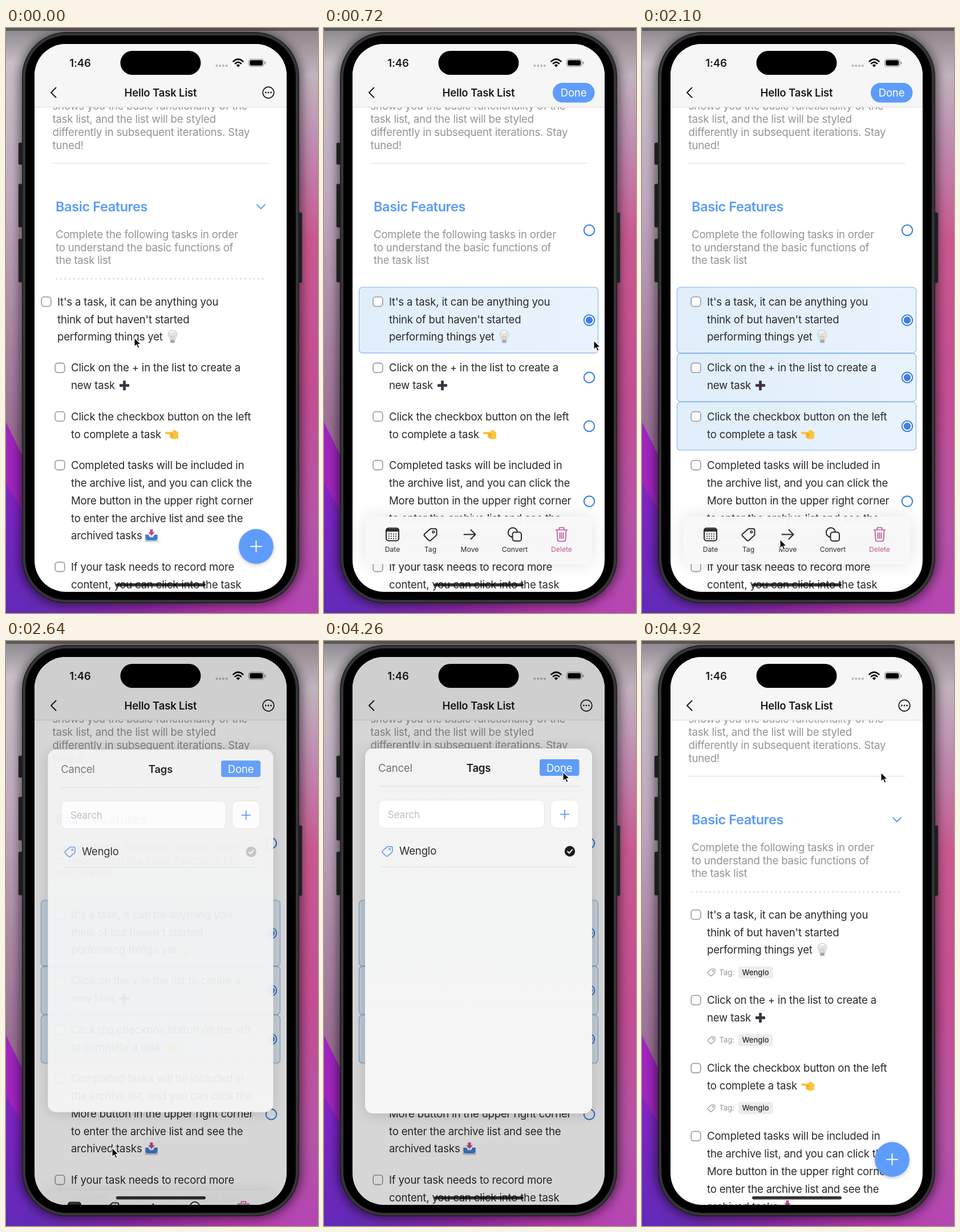
Write an HTML page that moves like this. It is 547x1024 px and loops after 4980 ms.

```html
<!DOCTYPE html>
<html lang="en">
<head>
<meta charset="utf-8">
<title>Task list</title>
<style>
html, body { margin: 0; width: 100%; height: 100%; overflow: hidden; background: #b49ab2; }
svg { display: block; width: 100%; height: 100%; }
text { font: 400 18.6px Inter, Roboto, sans-serif; letter-spacing: -.19px; fill: #2a2a2e; }
.note { fill: #949499; }
.head { font-size: 23.5px; font-weight: 600; letter-spacing: -.4px; fill: #5a9bfa; }
.bold { font-weight: 600; fill: #1c1c1e; }
.medium { font-weight: 500; }
.mid { text-anchor: middle; }
.white { fill: #fff; }
.soft { fill: #737378; }
.hint { font-size: 17.4px; fill: #c0c0c5; }
.label { font-size: 12.2px; letter-spacing: 0; text-anchor: middle; }
.pink { fill: #c2559a; }
.small { font-size: 13px; letter-spacing: 0; }
.line { fill: none; stroke-linecap: round; stroke-linejoin: round; }
.bar { filter: drop-shadow(0 0 14px rgba(0,0,0,.12)); }
.card { filter: drop-shadow(0 2px 12px rgba(0,0,0,.16)); }
.fab { filter: drop-shadow(0 2px 3px rgba(0,0,0,.22)); }
</style>
</head>
<body>
<svg id="stage" viewBox="0 0 547 1024" preserveAspectRatio="none"></svg>
<script>
const LOOP = 4980, STEP = 60, TAG = 'Wenglo';
const BLUE = '#5e9cfb', INK = '#2a2a2e', PINK = '#c2559a';

// ---- drawing helpers
const text = (x, y, s, cls = '') => `<text x="${x}" y="${y}" class="${cls}">${s}</text>`;
const rect = (x, y, w, h, r, fill, more = '') =>
  `<rect x="${x}" y="${y}" width="${w}" height="${h}" rx="${r}" fill="${fill}" ${more}/>`;
const dot = (x, y, r, fill, more = '') => `<circle cx="${x}" cy="${y}" r="${r}" fill="${fill}" ${more}/>`;
const line = (d, color, w = 2) => `<path class="line" d="${d}" stroke="${color}" stroke-width="${w}"/>`;
const at = (x, y, s, scale = 1) => `<g transform="translate(${x} ${y}) scale(${scale})">${s}</g>`;
const group = (id, s) => `<g id="${id}">${s}</g>`;
const grad = (id, stops, dir = 'x2="0" y2="1"') => `<linearGradient id="${id}" ${dir}>` +
  stops.map(([o, c]) => `<stop offset="${o}" stop-color="${c}"/>`).join('') + '</linearGradient>';

const tagIcon = (color, w = 2) => line(
  'M1-10h7q3 0 3 3v7q0 1-1 2L1 10q-2 2-4 0L-10 3q-2-2 0-4L-1-9q1-1 2-1Z', color, w) +
  dot(5.3, -4.4, 1.8, 'none', `stroke="${color}" stroke-width="${w * .8}"`);

const pics = {
  bulb: `<path d="M-5 5C-5 1-8-1-8-4A8 8 0 0 1 8-4C8-1 5 1 5 5Z" fill="#e3e3e2" stroke="#c4c4c3" stroke-width=".8"/>` +
    line('M-4-7Q-2-10 2-9', '#fff', 2) +
    line('M-2 4L-3-2 0 0 3-2 2 4', '#c9b98f', .8) + rect(-4, 5, 8, 5.5, 2, '#a9a9ab'),
  plus: rect(-8.5, -2.4, 17, 4.8, .8, '#3b3541') + rect(-2.4, -8.5, 4.8, 17, .8, '#3b3541'),
  hand: `<path d="M-10-4H1L4-7Q6-8 8-6L12-3V7Q7 10 1 8L-2 6Q-4 4-2 2L-3 0H-10Q-12-2-10-4Z" fill="#fcc43c"/>` +
    line('M-2 2H3M-1 5H3M-3 0H4', '#dd9420', 1),
  tray: rect(-11.5, 1, 23, 10, 1.5, '#c9ced6') +
    `<path d="M-11-2H-5L-3 3H3L5-2H11L10 6Q9 8 7 8H-7Q-9 8-10 6Z" fill="#3d79d2"/>` +
    `<path d="M-2.5-11H2.5V-6H6L0 0-6-6H-2.5Z" fill="#bd4792"/>`
};

// ---- tasks: centre of first line, text lines, picture [name, x, line]
const rows = [
  [479, ["It's a task, it can be anything you", "think of but haven't started", 'performing things yet'], ['bulb', 316, 2]],
  [594.8, ['Click on the + in the list to create a', 'new task'], ['plus', 207.5, 1]],
  [680, ['Click the checkbox button on the left', 'to complete a task'], ['hand', 290, 1]],
  [765.2, ['Completed tasks will be included in', 'the archive list, and you can click the',
    'More button in the upper right corner', 'to enter the archive list and see the', 'archived tasks'], ['tray', 255, 4]],
  [943.2, ['If your task needs to record more', 'content, you can click into the task']]
];
const PITCH = 30.9;
const ring = cy => dot(465, cy, 9.2, '#fff', 'stroke="#3d80e6" stroke-width="2.1"');

function rowMarkup([y, lines, pic], i) {
  const h = lines.length * PITCH + 23.2, marked = i < 3, cy = y + h / 2 - 25.5;
  let s = '';
  if (marked) s += group('box' + i, rect(61.5, y - 25.2, 419, h - .8, 6, 'url(#pickFill)', 'stroke="#86b2ee" stroke-width="1.1"'));
  let body = rect(86.2, y - 8.3, 16.6, 16.6, 4.6, '#fff', 'stroke="#a2a2a7" stroke-width="1.8"');
  lines.forEach((t, n) => body += text(114, y + 6.6 + n * PITCH, t));
  if (pic) body += at(pic[1], y + pic[2] * PITCH, pics[pic[0]]);
  s += group('body' + i, body);
  if (marked) {
    const ty = y + lines.length * PITCH + 8.3;
    s += group('tag' + i, at(121.5, ty, tagIcon('#98989d', 2.2), .58) + text(135.5, ty + 4.7, 'Tag:', 'small note') +
      rect(169, ty - 10.5, 60.5, 21, 4, '#ececee') + text(199, ty + 4.7, TAG, 'small medium mid'));
  }
  if (i < 4) s += `<g class="radio">${ring(cy)}${marked ? dot(465, cy, 6.2, '#3d80e6', `id="dot${i}"`) : ''}</g>`;
  return group('row' + i, s);
}

// ---- scenery and phone
const defs = '<defs>' +
  grad('leftFill', [[0, '#8b868b'], [.06, '#c8c1c8'], [.3, '#bfa8be'], [.55, '#a983a2'], [.72, '#986b92']]) +
  grad('rightFill', [[0, '#8c858a'], [.08, '#c2b3be'], [.2, '#bf8bb0'], [.36, '#c9588f'], [.62, '#c44e94'], [.85, '#b653a6'], [1, '#b445b2']]) +
  grad('floorFill', [[0, '#622ab4'], [.4, '#8a2aa8'], [.75, '#b23aa6'], [1, '#b445b2']], '') +
  grad('violetFill', [[0, '#8424c6'], [1, '#622ab8']]) +
  grad('pickFill', [[0, '#dfeefa'], [1, '#e9f3fd']], '') +
  grad('sheetFill', [[0, '#f3f3f3'], [.5, '#f3f4f4'], [1, '#f5f5f5']]) +
  '<filter id="blur" x="-20%" y="-20%" width="140%" height="140%"><feGaussianBlur stdDeviation="9"/></filter>' +
  '<clipPath id="glass"><rect x="50" y="28" width="442" height="959" rx="55"/></clipPath>' +
  '<clipPath id="pageClip"><rect x="50" y="138" width="442" height="849"/></clipPath></defs>';

const scenery = rect(0, 0, 274, 1024, 0, 'url(#leftFill)') + rect(274, 0, 273, 1024, 0, 'url(#rightFill)') +
  '<path d="M0 690L60 812V1024H0Z" fill="#a125bf"/><path d="M0 798L60 892V1024H0Z" fill="url(#violetFill)"/>' +
  rect(40, 985, 470, 39, 0, 'url(#floorFill)') +
  rect(24, 8, 494, 1002, 80, '#000', 'opacity=".55" filter="url(#blur)"') +
  rect(0, 0, 547, 5, 0, '#333', 'opacity=".55"');

const phone = [[22, 201, 38], [22, 273, 76], [22, 369, 76], [511, 323, 123]]
  .map(([x, y, h]) => rect(x, y, 8, h, 2, '#1d1d1f', 'stroke="#39393b" stroke-width=".8"')).join('') +
  rect(28.7, 7.7, 484.6, 998.6, 78, '#353537', 'stroke="#1c1c1e" stroke-width="1.4"') +
  rect(34, 13, 474, 988, 72, '#000');

const nav = rect(50, 28, 442, 110, 0, '#f6f6f6') + rect(50, 138, 442, 1, 0, '#dcdcde') +
  text(130, 67.6, '1:46', 'bold mid') +
  [0, 1, 2, 3].map(i => dot(369.5 + i * 5.8, 66, 2, '#b4b4b9')).join('') +
  line('M398.5 58.5Q407 50.8 415.5 58.5M401.8 62.2Q407 57.6 412.2 62.2', '#000', 2.5) +
  '<path d="M403.7 65Q407 62 410.3 65L407 68.4Z"/>' +
  rect(425.5, 54.5, 26.5, 13, 4, 'none', 'stroke="#8c8c8e" stroke-width="1.1"') +
  rect(427.3, 56.3, 22.9, 9.4, 2.6, '#000') + rect(453.5, 58.8, 1.8, 4.6, .9, '#8c8c8e') +
  line('M87.5 104.5L79 113 87.5 121.5', '#1c1c1e', 2) + text(271, 119.6, 'Hello Task List', 'bold mid') +
  group('menu', dot(460, 113, 9.8, 'none', 'stroke="#1c1c1e" stroke-width="1.7"') +
    [-4.6, 0, 4.6].map(d => dot(460 + d, 113, 1.4, '#1c1c1e')).join('')) +
  group('done', rect(401, 96, 73.5, 34.5, 17.2, BLUE) + text(437.5, 119.8, 'Done', 'mid white'));

const dots = Array.from({ length: 48 }, (_, i) => dot(88.5 + i * 7.7, 439, 1.2, '#d0d0d4')).join('');
const page = ['shows you the basic functionality of the', 'task list, and the list will be styled',
  'differently in subsequent iterations. Stay', 'tuned!'].map((t, i) => text(81.5, 143.4 + i * 22.8, t, 'note')).join('') +
  rect(82, 236.3, 379, 1.2, 0, '#dedee0') + text(87, 320.8, 'Basic Features', 'head') +
  ['Complete the following tasks in order', 'to understand the basic functions of', 'the task list']
    .map((t, i) => text(87, 367.6 + i * 22.9, t, 'note')).join('') +
  group('fold', line('M440 309.3L447 316.3 454 309.3', BLUE, 2) + dots) +
  `<g class="radio">${ring(354)}</g>` + rows.map(rowMarkup).join('');

const fab = dot(0, 0, 30.4, BLUE, 'class="fab"') + line('M-9.5 0H9.5M0-9.5V9.5', '#fff', 2);

// ---- bottom toolbar
const calendar = rect(-11, -11, 22, 22, 4, 'none', `stroke="${INK}" stroke-width="2"`) + rect(-11, -10, 22, 5, 1, INK) +
  [-1, 3, 7].map(y => [-6, -2, 2, 6].map(x => dot(x, y, 1.1, INK)).join('')).join('');
const convert = dot(-3.5, -3.5, 8.2, 'none', `stroke="${INK}" stroke-width="2"`) +
  rect(-4, -4, 15.5, 15.5, 4, '#f8f8f8', `stroke="${INK}" stroke-width="2"`);
const trash = line('M-10-8H10M-4-8V-12H4V-8M-8-8L-7 9Q-7 12-4 12H4Q7 12 7 9L8-8M-3-3V7M0-3V7M3-3V7', PINK, 1.7);
const tools = [[120, calendar, 'Date'], [186.5, tagIcon(INK), 'Tag'], [255.5, line('M-10 0H10M2-8L10 0 2 8', INK), 'Move'],
  [334.5, convert, 'Convert'], [416.5, trash, 'Delete', 'pink']];
const bar = rect(72, 855, 398, 83.5, 12, '#f8f8f8', 'class="bar" fill-opacity=".97"') +
  tools.map(([x, icon, name, tint = '']) => at(x, 886.5, icon) + text(x, 917, name, 'label ' + tint)).join('');

// ---- tag sheet
const sheet = rect(72, 188, 398, 639, 14, 'url(#sheetFill)', 'class="card"') +
  text(95, 228.6, 'Cancel', 'soft') + text(271, 228.6, 'Tags', 'bold mid') +
  rect(378, 207, 69.5, 29, 4, BLUE) + text(412.7, 228.6, 'Done', 'mid white') +
  rect(95, 253.8, 352, 1, 0, '#dcdcde') +
  rect(95.5, 278.5, 291, 49, 10, '#fff', 'stroke="#e6e6e8"') + text(111.5, 309.6, 'Search', 'hint') +
  rect(397.5, 278.5, 49, 49, 10, '#fff', 'stroke="#e6e6e8"') + line('M414.5 303.3H429.5M422 295.8V310.8', BLUE, 1.8) +
  at(111, 368, tagIcon('#5a94e6', 1.8), .82) + text(132, 374.4, TAG) +
  dot(431, 368, 9.2, '#c4c4c6', 'id="check"') + line('M427 368.4L430 371.3 435.2 365.2', '#fff', 1.9) +
  rect(100, 395, 340, 1, 0, '#e0e0e2');

const stage = document.getElementById('stage');
stage.innerHTML = defs + scenery + phone +
  '<g clip-path="url(#glass)">' + rect(50, 28, 442, 959, 0, '#fff') +
  `<g clip-path="url(#pageClip)">${page}</g>` + nav + group('fab', fab) + group('bar', bar) +
  group('dim', rect(50, 28, 442, 959, 0, '#000')) +
  group('sheet', sheet) + rect(193, 972, 157, 5.4, 2.7, '#000', 'opacity=".8"') + '</g>' +
  rect(200.5, 40, 141, 42, 21, '#000') +
  group('cursor', '<path d="M0 0V16L3.7 12.6 6.3 18.4 9 17.2 6.4 11.6H11.4Z" stroke="#fff" stroke-width="1.2"/>');

// ---- motion tables: [ms, value]
const tracks = {
  x: [[0, 225], [120, 206], [240, 206], [660, 473], [720, 473], [840, 466], [960, 465], [1260, 465], [2100, 242],
    [2280, 186], [2760, 186], [3360, 428], [3600, 428], [4140, 419], [LOOP, 419]],
  y: [[0, 542], [240, 543], [660, 547], [720, 547], [840, 617], [900, 617], [1020, 702], [1260, 702], [2100, 895],
    [2280, 887], [2760, 887], [3360, 370], [3600, 370], [4140, 229], [4800, 230]],
  swipe: [[0, -24], [120, -44], [240, -44], [480, 0]],
  edit: [[240, 0], [420, 1], [4440, 1], [4620, 0]],
  done: [[240, 0], [420, 1], [2400, 1], [2520, 0]],
  bar: [[240, 165], [540, 0], [2460, 0], [2760, 165]],
  fab: [[180, 1], [360, 0], [4560, 0], [4740, 1]],
  pick0: [[240, 0], [360, 1], [4440, 1], [4620, 0]],
  pick1: [[840, 0], [960, 1], [4440, 1], [4620, 0]],
  pick2: [[1020, 0], [1140, 1], [4440, 1], [4620, 0]],
  dim: [[2400, 0], [2640, .16], [4380, .16], [4620, 0]],
  sheet: [[2400, 0], [2700, 1], [4380, 1], [4620, 0]],
  check: [[3420, 0], [3480, 1]],
  tags: [[4560, 0], [4740, 1]]
};

function value(keys, t) {
  const n = keys.findIndex(k => k[0] > t);
  if (n === 0) return keys[0][1];
  if (n < 0) return keys[keys.length - 1][1];
  const [t0, a] = keys[n - 1], [t1, b] = keys[n], u = (t - t0) / (t1 - t0);
  return a + (b - a) * u * u * (3 - 2 * u);
}

const el = id => document.getElementById(id);
const move = (id, x, y, more = '') => el(id).setAttribute('transform', `translate(${x} ${y}) ${more}`);
const fade = (id, v) => el(id).setAttribute('opacity', v);
const radios = [...document.querySelectorAll('.radio')];

function render(t) {
  const v = {};
  for (const k in tracks) v[k] = value(tracks[k], t);
  move('cursor', v.x, v.y);
  move('body0', v.swipe, 0);
  rows.forEach((_, i) => move('row' + i, 0, Math.min(i, 3) * 33.8 * v.tags));
  for (let i = 0; i < 3; i++) {
    fade('box' + i, v['pick' + i]);
    fade('dot' + i, v['pick' + i]);
    fade('tag' + i, v.tags);
  }
  radios.forEach(r => r.setAttribute('opacity', v.edit));
  fade('fold', 1 - v.edit);
  fade('done', v.done);
  fade('menu', 1 - v.done);
  move('bar', 0, v.bar);
  el('bar').style.display = v.bar > 164 ? 'none' : '';
  move('fab', 438.5, 907.5, `scale(${.6 + .4 * v.fab})`);
  fade('fab', v.fab);
  fade('dim', v.dim);
  fade('sheet', Math.min(1, v.sheet * 1.05));
  move('sheet', 271, 507.5, `scale(${.93 + .07 * v.sheet}) translate(-271 -507.5)`);
  el('check').setAttribute('fill', v.check > .5 ? '#1c1c1e' : '#c4c4c6');
}

const start = performance.now();
function tick() {
  const t = (performance.now() - start) % LOOP;
  render(Math.floor(t / STEP) * STEP);
  requestAnimationFrame(tick);
}
tick();
</script>
</body>
</html>
```
